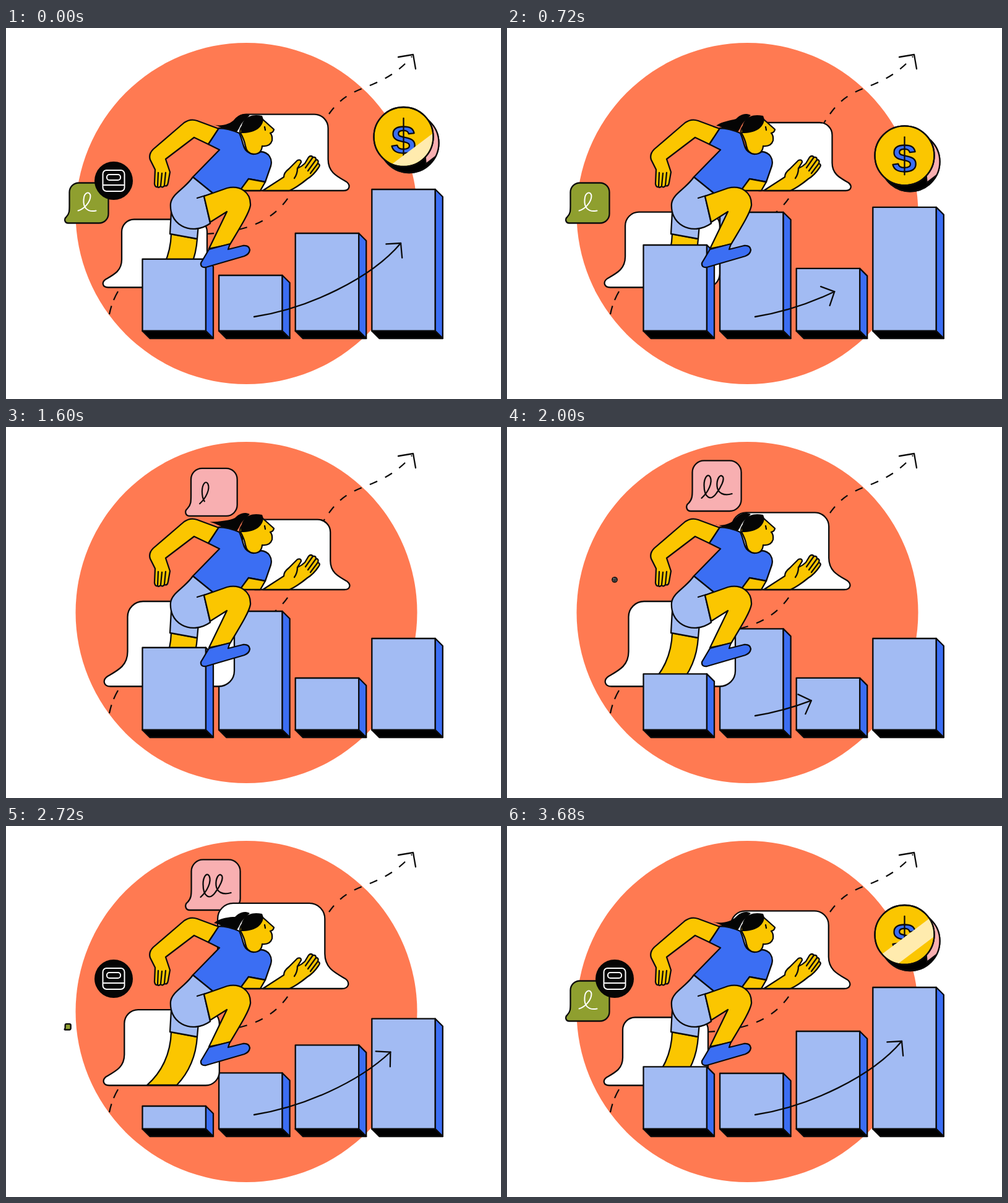
An HTML page for the animation above (3.76 s loop, 800 by 600 pixels).

```html
<!DOCTYPE html>
<html lang="en">
<head>
<meta charset="utf-8">
<title>Climbing the chart</title>
<style>
  html, body { margin: 0; width: 100%; height: 100%; overflow: hidden; background: #fff; }
  svg { display: block; width: 800px; height: 600px; }
  .ink { stroke: #0b0b0b; stroke-width: 2.3; stroke-linejoin: round; stroke-linecap: round; }
  .line { fill: none; }
  .keep { vector-effect: non-scaling-stroke; }
  .blue { fill: #3b6ef3; }
  .light { fill: #a2bbf3; }
  .skin { fill: #fbc600; }
  .pink { fill: #f8afb1; }
  .olive { fill: #8f9f2f; }
  .white { fill: #fff; }
  .dash { fill: none; stroke: #0b0b0b; stroke-width: 2.2; stroke-dasharray: 13 14.3; }
  .chalk { fill: none; stroke: #fff; stroke-width: 2; stroke-linecap: round; }
  .dollar { font: bold 62px "Liberation Sans", Arial, sans-serif; text-anchor: middle; }
</style>
</head>
<body>
<svg viewBox="0 0 800 600">
  <defs>
    <path id="talk" class="keep" d="M8 0C-1 0-3-8 4-13C18-21 30-27 30-45V-90A20 20 0 0 1 50-110H148A20 20 0 0 1 168-90V-20A20 20 0 0 1 148 0Z"/>
    <path id="chat" class="keep" d="M6 0C0 0-1-7 3-10C8-15 8-20 8-28V-50A15 15 0 0 1 23-65H56A15 15 0 0 1 71-50V-15A15 15 0 0 1 56 0Z"/>
    <clipPath id="face"><circle r="47"/></clipPath>
    <clipPath id="edge"><circle cx="9" cy="10" r="48"/></clipPath>
  </defs>

  <circle cx="388.5" cy="300" r="276" fill="#ff7a52"/>

  <path class="dash" d="M167 463Q171 443 181 426" style="stroke-dasharray:14 10 20"/>
  <path class="dash" d="M323 333C385 330 430 314 457 273"/>
  <path class="dash" d="M512 154L515 149"/>
  <path class="dash" d="M522 139C545 106 570 101 595 90C620 79 637 68 656 46"/>
  <path class="ink line" d="M634 47L658 43L662 66"/>

  <g id="pinkChat">
    <use href="#chat" class="ink pink" transform="scale(1.255)"/>
    <path id="pinkNote" class="ink line" pathLength="1" d="M25-21C36-31 43-46 39-55C35-62 29-54 29-42C29-22 40-15 49-29C56-38 63-52 59-56C54-61 49-50 50-40C51-29 61-24 74-28"/>
  </g>
  <use id="rightTalk" href="#talk" class="ink white"/>

  <g id="coin">
    <circle class="ink" cx="9" cy="10" r="48"/>
    <path class="ink pink" clip-path="url(#edge)" d="M30-40L62-60V24L36 44Z"/>
    <circle cx="9" cy="10" r="48" class="ink line"/>
    <circle class="ink skin" r="48"/>
    <text class="ink dollar blue" y="25.5">S</text>
    <path class="ink line" d="M0-30V31"/>
    <g clip-path="url(#face)">
      <rect id="shine" x="-70" width="140" height="28" fill="#ffebae"/>
    </g>
    <circle class="ink line" r="48"/>
  </g>

  <g id="farBars" class="ink"></g>
  <use id="leftTalk" href="#talk" class="ink white"/>
  <path class="ink skin" d="M267 333C266 368 252 398 228 419H276C296 398 307 372 309 341Z"/>
  <g id="nearBar" class="ink"></g>

  <path id="trend" class="ink line" d="M401 467C490 453 590 405 638 348"/>
  <path id="tip" class="ink line" d="M-16.5-17L0 0L-16.5 17"/>

  <path id="tail" fill="#050505"/>
  <path class="ink skin" d="M344 163L309 150Q298 146 288 153L238 196Q230 204 233 213L241 229L240 252Q241 258 245 257Q246 259 250 256Q253 259 256 255Q261 257 262 250L265 233L258 212L304 177L327 188Z"/>
  <path class="ink line" d="M246 234L245 256M252 235L250 255M258 234L256 254"/>

  <path class="ink light" d="M267 298L265 333L309 341L311 318Z"/>
  <path class="ink blue" d="M344 162C356 162 366 165 377 170C383 182 383 196 390 200C400 206 408 203 412 200C425 201 431 212 428 223L419 249L392 244L379 262L350 275L334 267L302 241L345 197L327 188Z"/>
  <path class="ink skin" d="M392 244L419 249L411 263H378Z"/>
  <path class="ink skin" d="M415 263L449 241Q449 234 457 228L471 214Q477 212 477 217L471 227Q478 224 483 219L489 209Q493 205 496 209Q501 208 501 213Q506 213 504 219Q509 221 505 226Q497 238 487 244Q470 258 458 263Z"/>
  <path class="ink line" d="M471 227Q471 236 466 243M496 209L484 226M501 213L488 231M504 219L492 235"/>

  <path class="ink skin" d="M414 147L433 164Q432 169 427 170Q431 174 430 182Q427 192 414 191Q413 204 400 204Q389 203 387 191C385 180 382 175 378 168C378 158 390 148 414 147Z"/>
  <path d="M380 170C378 150 390 137 414 142L416 148C414 162 402 170 380 170Z" fill="#050505"/>
  <path class="ink line" d="M418 160L419 165"/>

  <path class="ink light" d="M302 241L334 267L320 272L330 316C316 326 298 328 284 320C270 312 265 298 266 284C268 268 288 261 302 241Z"/>
  <path class="ink skin" d="M320 272L357 259C378 254 396 265 395 287C393 300 375 328 362 350L328 357L357 297L330 314Z"/>
  <path class="ink line" d="M309 275L322 271"/>
  <path class="ink blue" d="M328 358L362 349L359 358L383 352Q393 351 394 359Q393 366 385 369L323 387Q314 388 315 380Z"/>

  <g id="oliveChat">
    <use href="#chat" class="ink olive"/>
    <path id="oliveNote" class="chalk" pathLength="1" d="M22-20C32-23 42-34 42-44C41-52 32-51 31-38C30-26 36-17 51-20"/>
  </g>
  <g id="badge">
    <circle r="31" fill="#050505"/>
    <rect class="chalk" x="-17.5" y="-17" width="35" height="34" rx="6"/>
    <rect class="chalk" x="-11" y="-10" width="22" height="9" rx="4"/>
    <path class="chalk" d="M-17 7H17"/>
  </g>
</svg>

<script>
const LOOP = 3760, STEP = 80;
const $ = id => document.getElementById(id);
const set = (el, name, value) => el.setAttribute(name, value);
const place = (id, value) => set($(id), 'transform', value);
const show = (id, on) => { $(id).style.display = on ? '' : 'none'; };
const wrap = t => (t % LOOP + LOOP) % LOOP;
const clamp = x => Math.min(1, Math.max(0, x));
const ease = x => { const u = clamp(x); return u * u * (3 - 2 * u); };

// Eases from 0 to 1 at time `up` and back to 0 at time `down`, once per loop.
function pulse(t, up, down, upLen, downLen = upLen) {
  const age = wrap(t - up), hold = wrap(down - up);
  return age < hold ? ease(age / upLen) : 1 - ease((age - hold) / downLen);
}

// Each bar jumps from `rest` to `peak`, then settles back more slowly.
const bars = [
  { rest: 453, peak: 351, jump: 3260, len: 720, back: 1430 },
  { rest: 400, peak: 298, jump: 0, len: 520, back: 1590 },
  { rest: 332, peak: 406, jump: 170, len: 800, back: 1970 },
  { rest: 261, peak: 342, jump: 450, len: 670, back: 2230 }
];

bars.forEach((bar, i) => {
  bar.x = 220.5 + 123.6 * i;
  bar.faces = ['light', 'blue', ''].map(name => {
    const face = document.createElementNS('http://www.w3.org/2000/svg', 'path');
    set(face, 'class', name);
    $(i ? 'farBars' : 'nearBar').append(face);
    return face;
  });
});

function drawBar({ rest, peak, jump, len, back, x, faces }, t) {
  const top = rest + (peak - rest) * pulse(t, jump, back, len, 1180), r = x + 102.5;
  set(faces[0], 'd', `M${x} ${top}H${r}V490H${x}Z`);
  set(faces[1], 'd', `M${r} ${top}l12 12V502L${r} 490Z`);
  set(faces[2], 'd', `M${x} 490H${r}l12 12H${x + 12}Z`);
}

// A small bubble pops up, its note is written, and it settles upward.
function drawChat(name, x, y, on, off, t) {
  const size = pulse(t, on, off, 420);
  const drop = 8 - 8 * pulse(t, on + 300, off + 500, 400);
  place(name + 'Chat', `translate(${x} ${y + 7 * (1 - size) + drop}) scale(${size})`);
  show(name + 'Chat', size > 0.01);
  set($(name + 'Note'), 'stroke-dasharray', pulse(t, on + 160, off + 500, 440) + ' 2');
}

const trend = $('trend'), span = trend.getTotalLength();

function drawTrend(t) {
  const p = t < 1500
    ? 1 - ease((t - 480) / 480)
    : 1 - (1 - clamp((t - 1771) / 1718)) ** 3;
  const end = trend.getPointAtLength(p * span);
  const from = trend.getPointAtLength(Math.max(0, p * span - 3));
  const angle = Math.atan2(end.y - from.y, end.x - from.x) * 180 / Math.PI;
  show('trend', p > 0.005);
  show('tip', p > 0.005);
  set(trend, 'stroke-dasharray', `${p * span} ${span * 2}`);
  place('tip', `translate(${end.x} ${end.y}) rotate(${angle})`);
}

// The ponytail swings twice per loop; its middle follows the tip.
function drawTail(t) {
  const u = 4 * Math.PI * t / LOOP;
  const a = -Math.sin(u), b = Math.cos(u - 1.2 * Math.PI);
  set($('tail'), 'd', `M394 141C384 136 376 141 370 147C362 ${151 - 7 * b} 346 ${153 - 8 * b}
    ${334 - 6 * a} ${156 - 3 * a}C346 158 354 167 370 169C378 167 376 156 388 147Z`);
}

function draw(t) {
  bars.forEach(bar => drawBar(bar, t));
  drawTrend(t);
  drawTail(t);
  drawChat('pink', 289.5, 136, 1240, 3200, t);
  drawChat('olive', 94.5, 315.5, 2620, 860, t);

  const left = 0.25 * pulse(t, 225, 2026, 1094, 1302);
  const right = 0.255 * pulse(t, 1305, 2996, 1351, 1488);
  place('leftTalk', `translate(${157 + 8 * left} 419.5) scale(${1 + left})`);
  place('rightTalk', `translate(${555.5 - 10 * right} 263) scale(${-1 - right} ${1 + right})`);

  place('coin', `translate(642.5 ${176 + 224 * pulse(t, 510, 2500, 910, 950)})`);
  const sweep = wrap(t + LOOP / 2) - LOOP / 2;
  place('shine', `rotate(-37) translate(0 ${24 + sweep * 0.2625})`);

  const badge = pulse(t, 1900, 120, 400);
  place('badge', `translate(174 247) scale(${badge})`);
  show('badge', badge > 0.01);
}

function tick() {
  const t = performance.now() % LOOP;
  draw(Math.floor(t / STEP) * STEP);
  requestAnimationFrame(tick);
}
tick();
</script>
</body>
</html>
```
